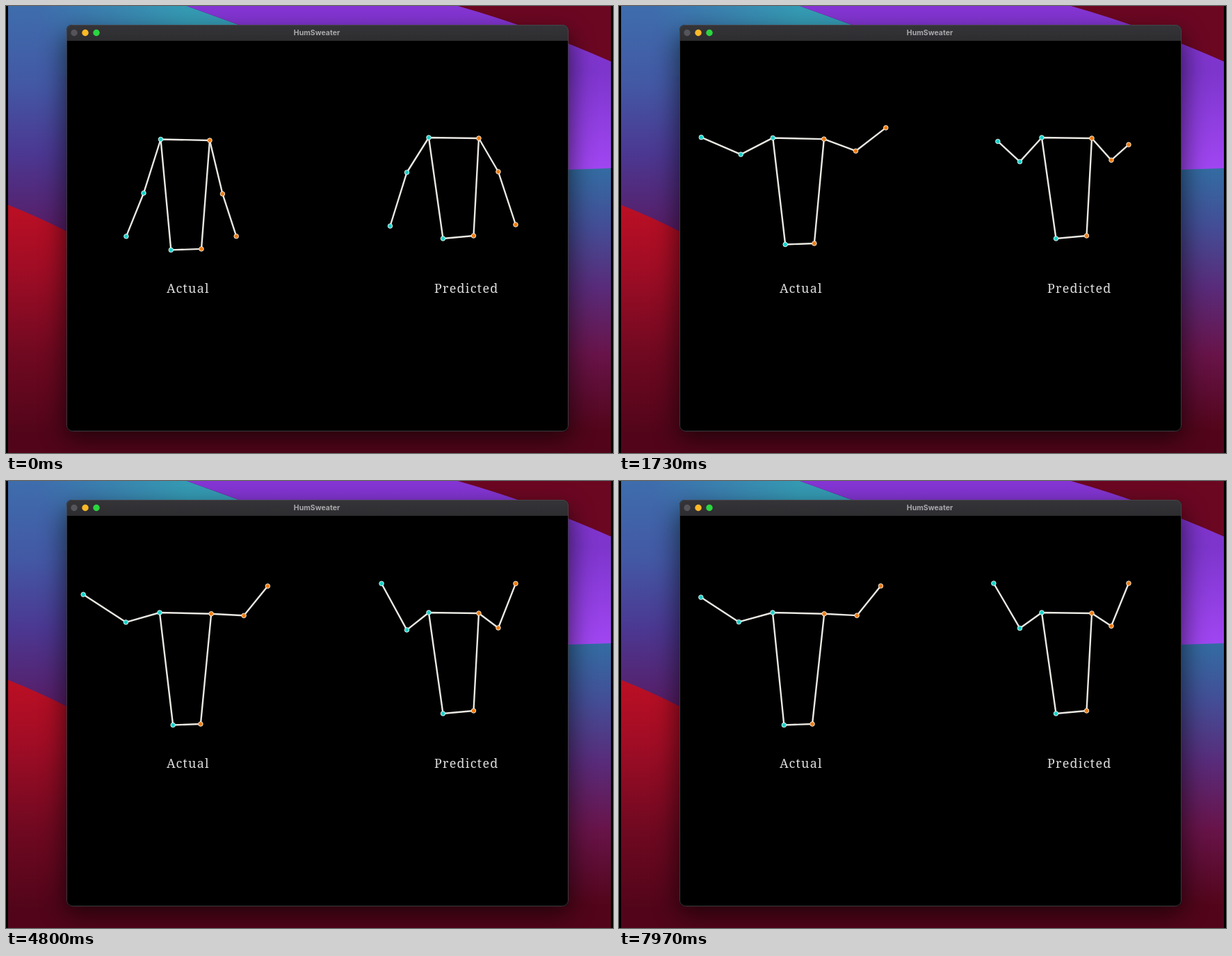
Recreate the animation shown at these times as an HTML page. Size 873 px wide and 642 px high, loop 8 s.

```html
<!DOCTYPE html>
<html lang="en">
<head>
<meta charset="utf-8">
<title>Pose comparison</title>
<style>
  html, body { margin: 0; width: 100%; height: 100%; overflow: hidden; background: #000; }
  svg { display: block; width: 100%; height: 100%; }
  .title { font: 700 10.5px Inter, Roboto, sans-serif; fill: #a9a8ab; text-anchor: middle; }
  .label { font: 300 18px "Noto Serif", "Liberation Serif", serif; letter-spacing: 1.2px; fill: #dcdcdc; }
  .bone { fill: none; stroke: #e9e7e2; stroke-width: 2.4; stroke-linejoin: round; stroke-linecap: round; }
  .joint { stroke: #f4f4f0; stroke-width: .9; }
  .left { fill: #18d3cb; }
  .right { fill: #f07c10; }
</style>
</head>
<body>
<svg viewBox="0 0 873 642" preserveAspectRatio="none">
  <defs>
    <linearGradient id="sky" gradientUnits="userSpaceOnUse" x1="0" y1="0" x2="0" y2="325">
      <stop offset="0" stop-color="#3e6dac"/>
      <stop offset=".35" stop-color="#4358a4"/>
      <stop offset=".65" stop-color="#4b3892"/>
      <stop offset="1" stop-color="#581c65"/>
    </linearGradient>
    <linearGradient id="teal" gradientUnits="userSpaceOnUse" x1="60" y1="60" x2="260" y2="10">
      <stop offset="0" stop-color="#359bb4" stop-opacity="0"/>
      <stop offset="1" stop-color="#359bb4"/>
    </linearGradient>
    <linearGradient id="red" gradientUnits="userSpaceOnUse" x1="0" y1="285" x2="0" y2="642">
      <stop offset="0" stop-color="#bc0f24"/>
      <stop offset=".25" stop-color="#a10d25"/>
      <stop offset=".6" stop-color="#700921"/>
      <stop offset=".92" stop-color="#52051a"/>
    </linearGradient>
    <linearGradient id="violet" gradientUnits="userSpaceOnUse" x1="0" y1="0" x2="0" y2="235">
      <stop offset="0" stop-color="#8535d4"/>
      <stop offset=".4" stop-color="#7d35cc"/>
      <stop offset="1" stop-color="#a146f2"/>
    </linearGradient>
    <linearGradient id="dusk" gradientUnits="userSpaceOnUse" x1="0" y1="233" x2="0" y2="642">
      <stop offset="0" stop-color="#336ca2"/>
      <stop offset=".2" stop-color="#434e96"/>
      <stop offset=".42" stop-color="#592b7a"/>
      <stop offset=".65" stop-color="#68144a"/>
      <stop offset=".92" stop-color="#52051a"/>
    </linearGradient>
    <linearGradient id="bar" x1="0" y1="0" x2="0" y2="1">
      <stop offset="0" stop-color="#353438"/>
      <stop offset="1" stop-color="#2d2c2f"/>
    </linearGradient>
    <filter id="blur" x="-20%" y="-20%" width="140%" height="140%">
      <feGaussianBlur stdDeviation="18"/>
    </filter>
    <clipPath id="desk"><rect x="3" width="867" height="642"/></clipPath>
    <clipPath id="frame"><rect x="87" y="27" width="722" height="584" rx="8"/></clipPath>
  </defs>

  <rect width="873" height="642" fill="#000"/>
  <g clip-path="url(#desk)">
    <rect width="873" height="642" fill="#52051a"/>
    <path d="M0 0H260L340 29V330H90L0 285Z" fill="url(#sky)"/>
    <path d="M0 0H260L340 29V100H0Z" fill="url(#teal)"/>
    <path d="M0 284.500Q45 302 90 325L400 460V642H0Z" fill="url(#red)"/>
    <path d="M260 0H873V235H700L335 27Z" fill="url(#violet)"/>
    <path d="M650 0H873V81Q760 31 650 0Z" fill="#6c0722"/>
    <path d="M700 237L808 235L873 233V642H700Z" fill="url(#dusk)"/>
    <rect x="84" y="40" width="728" height="582" rx="14" fill="#000" opacity=".6" filter="url(#blur)"/>
  </g>

  <g clip-path="url(#frame)">
    <rect x="87" y="27" width="722" height="585" fill="#000"/>
    <rect x="87" y="27" width="722" height="23" fill="url(#bar)"/>
  </g>
  <rect x="87.500" y="27.500" width="721" height="583" rx="8" fill="none" stroke="#4a494e" stroke-opacity=".8"/>
  <circle cx="98" cy="38.500" r="4.700" fill="#55545a"/>
  <circle cx="114" cy="38.500" r="4.700" fill="#fcb827"/>
  <circle cx="130" cy="38.500" r="4.700" fill="#2bd640"/>
  <text class="title" x="447" y="42">HumSweater</text>
  <text class="label" x="231" y="412">Actual</text>
  <text class="label" x="616" y="412">Predicted</text>
  <g id="figures"></g>
</svg>

<script>
const LOOP = 8000, FRAME = 1000 / 30;
const BONES = [
  ["wristL", "elbowL", "shoulderL", "shoulderR", "elbowR", "wristR"],
  ["shoulderL", "hipL", "hipR", "shoulderR"]
];

// Falls from 1 to 0; tau in seconds, a higher power starts more gently.
const decay = (t, tau, power = 1) => Math.exp(-((t / tau) ** power));
const mix = (from, to, rest) => to + (from - to) * rest;

// Swings a limb around a joint; angles in degrees from straight down, side is -1 or 1.
function swing([x, y], side, t, { turn, length, tau, power, sway = 0 }) {
  const rest = decay(t, tau, power);
  const angle = mix(...turn, rest) * Math.PI / 180;
  const reach = mix(...length, rest * rest) - sway * Math.sin(2 * Math.PI * t / 5.6);
  return [x + side * reach * Math.sin(angle), y + reach * Math.cos(angle)];
}

const LIMBS = {
  upperL: { turn: [17.6, 74.6], length: [81, 50.5], tau: 1.14, power: 1.08 },
  upperR: { turn: [13.5, 87], length: [79, 47], tau: 1.345, power: 1.42 },
  foreL: { turn: [22, 123], length: [67, 68], tau: 1, power: 1.55, sway: 6.5 },
  foreR: { turn: [18, 141], length: [64, 54.5], tau: 1.18, power: 2.07 }
};

function actual(t) {
  const rest = decay(t, 1);
  const lift = 8 * decay(Math.abs(t - 1.73), .8, 2);
  const shoulderL = [mix(222.5, 221, rest), mix(191.5, 189, rest)];
  const shoulderR = [mix(293, 295.2, rest), mix(193, 190.7, rest)];
  const elbowL = swing(shoulderL, -1, t, LIMBS.upperL);
  const elbowR = swing(shoulderR, 1, t, LIMBS.upperR);
  return {
    shoulderL, shoulderR, elbowL, elbowR,
    wristL: swing(elbowL, -1, t, LIMBS.foreL),
    wristR: swing(elbowR, 1, t, LIMBS.foreR),
    hipL: [237.3 + 3 * Math.sin(Math.PI * t / 8), 350.5 - lift],
    hipR: [281 - 3 * (t / 8) ** 2, 349 - lift]
  };
}

function predicted(t) {
  const slow = decay(t, 2.2);
  // The hands jump up first, then climb the rest of the way.
  const handY = (jump, climb) => 147 + jump * decay(t, .35, 2) + climb * decay(t, 2.75, 3);
  return {
    shoulderL: [608, 189],
    shoulderR: [680, 190],
    elbowL: [576.5, mix(239, 210.7, slow)],
    elbowR: [708, mix(238, 207.5, slow)],
    wristL: [mix(552.5, 538.5, slow), handY(108, 61)],
    wristR: [733, handY(100, 67)],
    hipL: [628.5, 334],
    hipR: [672.5, 330]
  };
}

const root = document.getElementById("figures");
function add(tag, className) {
  const el = document.createElementNS("http://www.w3.org/2000/svg", tag);
  el.setAttribute("class", className);
  return root.appendChild(el);
}

function makeFigure(poseAt) {
  const bones = BONES.map(() => add("polyline", "bone"));
  const dots = Object.keys(poseAt(0)).map(name => {
    const dot = add("circle", "joint " + (name.endsWith("L") ? "left" : "right"));
    dot.setAttribute("r", 3.3);
    return [name, dot];
  });
  return t => {
    const pose = poseAt(t);
    for (const [name, dot] of dots) {
      dot.setAttribute("cx", pose[name][0]);
      dot.setAttribute("cy", pose[name][1]);
    }
    BONES.forEach((names, i) =>
      bones[i].setAttribute("points", names.map(n => pose[n].join()).join(" ")));
  };
}

const figures = [actual, predicted].map(makeFigure);

function draw(ms) {
  // Slightly early, because the 30 fps steps are kept in whole 10 ms.
  const frame = Math.floor((ms % LOOP) / FRAME + .12);
  figures.forEach(update => update(frame * FRAME / 1000));
}

const start = performance.now();
function tick() {
  draw(performance.now() - start);
  requestAnimationFrame(tick);
}
tick();
</script>
</body>
</html>
```
